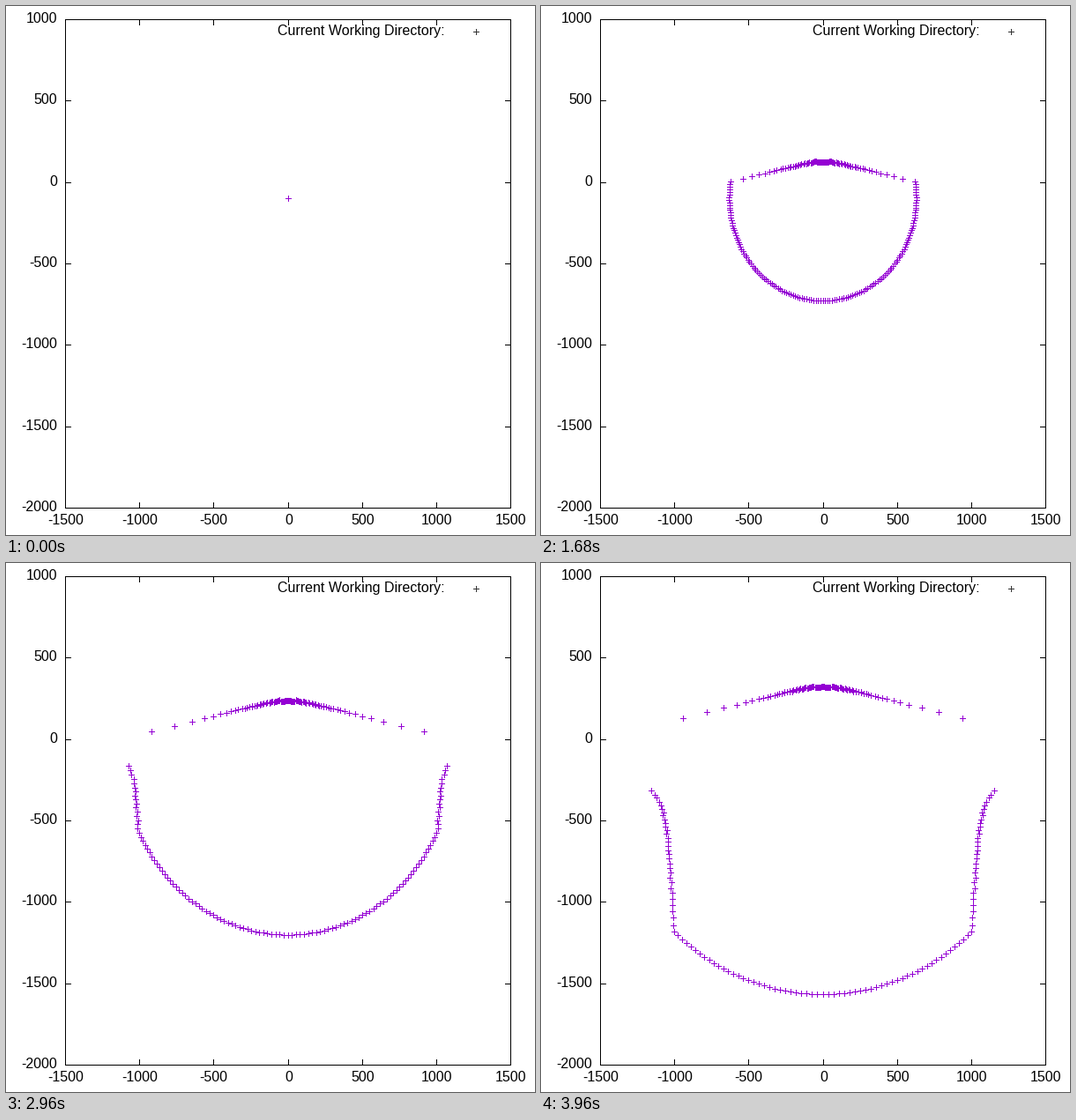
These frames come from a looping animation (600 px wide and 600 px high, 4000 ms). A matplotlib script:

```python
import numpy as np
import matplotlib.pyplot as plt
from matplotlib.animation import FuncAnimation
from matplotlib.patches import PathPatch, Rectangle
from matplotlib.path import Path

SIZE, FRAMES, INTERVAL = 600, 100, 40
LEFT, RIGHT, TOP, BOTTOM = 67, 572, 15, 569
RAYS = 250
WATER, AIR, BED = 15.0, 3.43, 7.0      # units per step
SOURCE_DEPTH = 100
VIOLET, DARK = "#9400d3", "#333333"

plt.rcParams["font.family"] = "Liberation Sans"


def to_px(x, y):
    """Plot coordinates to whole pixels, y counted from the top."""
    px = LEFT + (x + 1500) / 3000 * (RIGHT - LEFT)
    py = TOP + (1000 - y) / 3000 * (BOTTOM - TOP)
    return np.floor(px + 0.5), np.floor(py + 0.5)


def simulate():
    """Follow sound rays through water, refracting into air and sea bed."""
    heading = np.pi / 2 + np.arange(RAYS) * 2 * np.pi / RAYS
    x = np.zeros(RAYS)
    y = np.full(RAYS, -float(SOURCE_DEPTH))
    vx, vy = np.zeros(RAYS), np.zeros(RAYS)
    wet = np.ones(RAYS, bool)
    steps = [(x.copy(), y.copy())]
    for _ in range(FRAMES - 1):
        # the water gets slightly slower with depth, so rays curve down
        below = -y - SOURCE_DEPTH
        speed = WATER * (1 - 6e-6 * below - 1e-8 * below ** 2)
        slope = WATER * (6e-6 + 2e-8 * below)
        heading = np.where(wet, heading - slope * np.cos(heading), heading)
        vx = np.where(wet, speed * np.cos(heading), vx)
        vy = np.where(wet, speed * np.sin(heading), vy)
        x, y = x + vx, y + vy

        # lost in the shallows
        gone = wet & (np.abs(x) > 1090) & (y > -130)
        x[gone] = np.nan

        depth = np.maximum(-y, 1)
        up = wet & (y >= 0)
        down = wet & (np.abs(x) - 1000 > 1.27e6 / depth ** 2)
        bed = BED * (143 / depth) ** 0.35
        for hit, v, sign in ((up, AIR, 1), (down, bed, -1)):
            sin = v / WATER * np.cos(heading)
            vx = np.where(hit, v * sin, vx)
            vy = np.where(hit, sign * v * np.sqrt(1 - sin ** 2), vy)
        wet &= ~(up | down | gone)
        steps.append((x.copy(), y.copy()))
    return steps


# outline of a plus sign, 7 pixels wide with 1 pixel strokes
PLUS = np.array([(-3, 0), (0, 0), (0, -3), (1, -3), (1, 0), (4, 0), (4, 1),
                 (1, 1), (1, 4), (0, 4), (0, 1), (-3, 1), (-3, 0)], float)
PLUS_CODES = [Path.MOVETO] + [Path.LINETO] * 11 + [Path.CLOSEPOLY]


def plus_path(px, py):
    centres = np.column_stack([px, py])
    verts = (centres[:, None, :] + PLUS[None]).reshape(-1, 2)
    return Path(verts, PLUS_CODES * len(centres))


def add_pluses(px, py, color):
    patch = PathPatch(plus_path(px, py), fc=color, lw=0, snap=False,
                      antialiased=False)
    return ax.add_patch(patch)


def bar(x0, y0, x1, y1):
    """Black line covering both end pixels."""
    ax.add_patch(Rectangle((x0, y0), x1 - x0 + 1, y1 - y0 + 1, fc="black",
                           lw=0, snap=False, antialiased=False))


def label(x, y, text, ha):
    ax.text(x, y, text, fontsize=16, ha=ha, va="baseline", color="black")


fig = plt.figure(figsize=(SIZE / 72, SIZE / 72), dpi=72, facecolor="white")
ax = fig.add_axes([0, 0, 1, 1])
ax.set_xlim(0, SIZE)
ax.set_ylim(SIZE, 0)
ax.axis("off")

steps = simulate()
wave = add_pluses(*to_px(np.zeros(1), np.full(1, -100.0)), VIOLET)

for y in (TOP, BOTTOM):
    bar(LEFT, y, RIGHT, y)
for x in (LEFT, RIGHT):
    bar(x, TOP, x, BOTTOM)
for value in range(-1500, 1501, 500):
    x = int(to_px(value, 0)[0])
    bar(x, TOP, x, TOP + 6)
    bar(x, BOTTOM - 6, x, BOTTOM)
    label(x + 0.5, 588, str(value), "center")
for value in range(-2000, 1001, 500):
    y = int(to_px(0, value)[1])
    bar(LEFT, y, LEFT + 6, y)
    bar(RIGHT - 6, y, RIGHT, y)
    label(58, y + 4, str(value), "right")

label(498, 33, "Current Working Directory:", "right")
add_pluses([533], [29], DARK)


def draw(n):
    x, y = steps[n]
    seen = np.isfinite(x)
    wave.set_path(plus_path(*to_px(x[seen], y[seen])))
    return (wave,)


anim = FuncAnimation(fig, draw, frames=FRAMES, interval=INTERVAL,
                     init_func=lambda: draw(0), repeat=True, repeat_delay=0,
                     blit=False)
plt.show()
```
